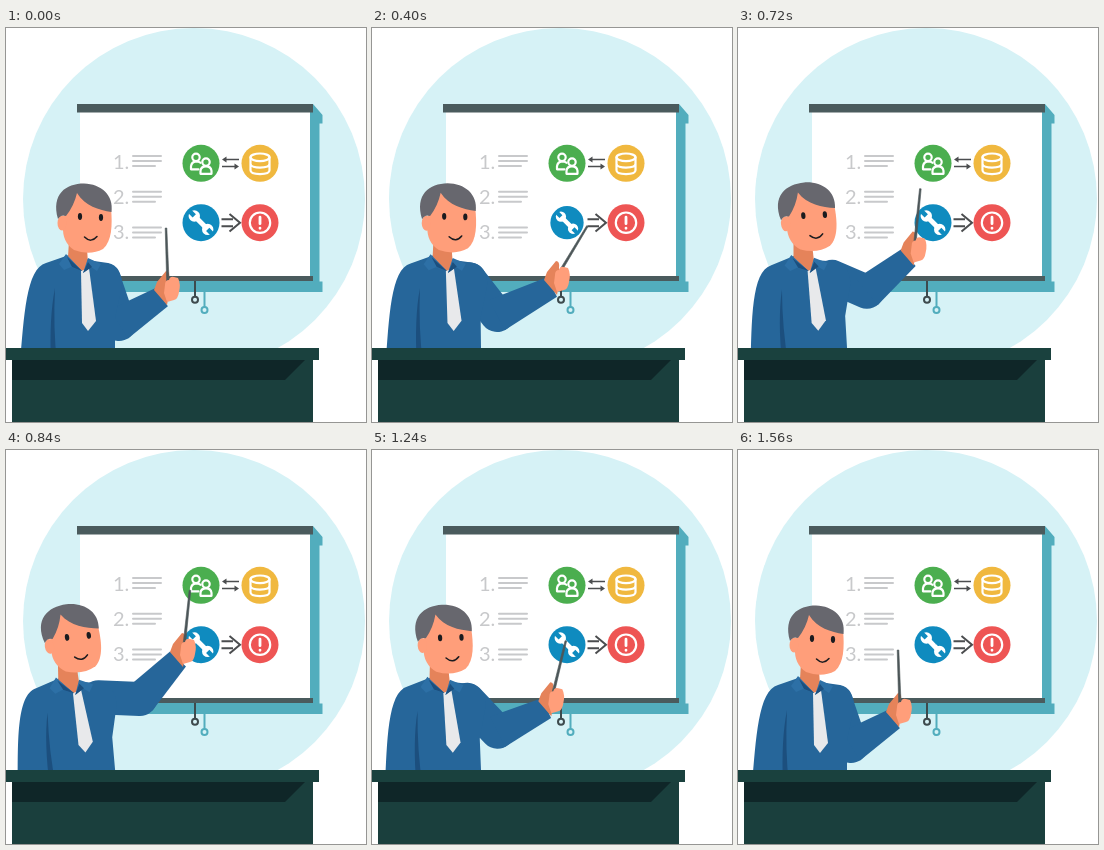
An HTML page that plays this animation: 360x394 px, repeating every 2 s.

```html
<!DOCTYPE html>
<html lang="en">
<head>
<meta charset="utf-8">
<title>Presenter</title>
<style>
  html, body { margin: 0; width: 100%; height: 100%; overflow: hidden; background: #fff; }
  svg { display: block; width: 360px; height: 394px; }
  text { font: 20px Lato, sans-serif; fill: #c8c9cb; }
  .line { fill: none; stroke: #fff; stroke-width: 2.2; stroke-linejoin: round; stroke-linecap: round; }
  .dark { stroke: #4b4d4f; stroke-linecap: butt; stroke-linejoin: miter; }
</style>
</head>
<body>
<svg viewBox="0 0 360 394">
  <circle cx="188" cy="171" r="171" fill="#d6f2f6"/>

  <g id="screen">
    <path d="M307 76L316.500 87V95.500H313.500V253.500H316.500V264H82L71 253H304V76Z" fill="#52adbd"/>
    <path d="M74 84H304V249H74Z" fill="#fff"/>
    <path d="M71 76H307V84.500H71ZM71 248H307V253H71Z" fill="#4a5b5d"/>
    <g fill="none" stroke-width="2">
      <path d="M189 253V268.500" stroke="#3d4a4d"/>
      <circle cx="189" cy="271.700" r="3" stroke="#3d4a4d"/>
      <path d="M198.500 263V279" stroke="#52adbd"/>
      <circle cx="198.500" cy="282" r="3" stroke="#52adbd"/>
    </g>
    <g id="list"></g>
    <path d="M216 131.500L220.500 128.500V130.700H233V132.300H220.500V134.500ZM233 138.500L228.500 135.500V137.700H216V139.300H228.500V141.500Z" fill="#4b4d4f"/>
    <path class="line dark" style="stroke-width:2" d="M215.500 191.300H227M215.500 198.300H227M223.500 186L234 194.700L223.500 203.500"/>
    <g id="people">
      <circle r="18.500" fill="#4bae4f"/>
      <g class="line">
        <circle cx="-5" cy="-6" r="3.700"/>
        <path d="M-2.500 6H-10V3Q-9.500-1.500-5-2Q-2-2-.5-.5"/>
        <circle cx="5" cy="-1.200" r="3.700"/>
        <path d="M-.5 10.500V7.500Q0 3 5 3T10.500 7.500V10.500Z"/>
      </g>
    </g>
    <g transform="translate(254 135.300)">
      <circle r="18.500" fill="#f0b83f"/>
      <g class="line">
        <ellipse cy="-6" rx="9.500" ry="3.800"/>
        <path d="M-9.500-6V7C-9.500 12 9.500 12 9.500 7V-6M-9.500 .5C-9.500 5.500 9.500 5.500 9.500 .5"/>
      </g>
    </g>
    <g id="tool">
      <circle r="18.500" fill="#0f8bbf"/>
      <g transform="rotate(45)">
        <path d="M-9 0H9" stroke="#fff" stroke-width="5"/>
        <circle cx="-9.500" r="5.700" fill="#fff"/>
        <circle cx="9.500" r="5.700" fill="#fff"/>
        <path d="M-16 0H-9.500M16 0H9.500" stroke="#0f8bbf" stroke-width="4.600"/>
      </g>
    </g>
    <g transform="translate(254 194.700)">
      <circle r="18.500" fill="#ee5554"/>
      <circle class="line" r="10.200"/>
      <path class="line" d="M0-5.500V1M0 5.500V5.600" style="stroke-width:2.800"/>
    </g>
  </g>

  <g fill="#26669a" stroke="#26669a" stroke-linecap="round">
    <path id="upperArm" stroke-width="34"/>
    <path id="forearm" stroke="none"/>
  </g>

  <g id="body">
    <path d="M14 335C18 290 20 240 40 235L63 227L88 233L102 235Q116 238 116 258L109 290V335Z" fill="#26669a"/>
    <path d="M49 260Q43 290 45 335H51Q47 300 49 260Z" fill="#1c4f7e"/>
    <path d="M63 213L81 220L82 236L77 244L62 229Z" fill="#e5835a"/>
    <path d="M75 243L83 240L90 293L82 303L76 295Z" fill="#e8e9eb"/>
    <path d="M60 226L76 243L65 239L58 242L53 236ZM82 230L95 236L91 243L85 239L77 245Z" fill="#2d70a6"/>
    <path d="M61 229L76 243L66 239ZM82 234L86 239L77 245Z" fill="#1c4f7e"/>
    <g id="head">
      <path d="M58 185L71 164L105 180C106.500 197 106 213 97 221Q84 228 68 222Q56 214 57 198Z" fill="#ff9e7a"/>
      <ellipse cx="56" cy="195" rx="4.500" ry="7.500" fill="#ff9e7a"/>
      <path d="M52 191C45 166 60 155.500 78 155.500C95 156 108 167 105.500 184C93 182 79 178 71 165Q68 178 60 188Q55 186 52 191Z" fill="#67676e"/>
      <g fill="#1b1b1f">
        <ellipse cx="74" cy="188.500" rx="2.100" ry="3.400"/>
        <ellipse cx="95" cy="189.500" rx="2.100" ry="3.400"/>
      </g>
      <path d="M78.500 209Q85 215.500 91 208.500" fill="none" stroke="#1b1b1f" stroke-width="1.500" stroke-linecap="round"/>
    </g>
  </g>

  <g id="hand">
    <path d="M-18 1L-15-7L-6-18Q-2-18-3-11L-2 0L-5 16Z" fill="#e5835a"/>
    <path id="pointer" d="M-1.200 0L-.8-57H.8L1.200 0Z" fill="#4c5658" stroke="#4c5658" stroke-width=".6"/>
    <path d="M-7-4Q-7-9-3-9Q-2-13 2-12L6-11Q9-5 7 3Q6 10 2 11L-5 13L-8 4Z" fill="#ff9e7a"/>
  </g>

  <path d="M6 331H307V394H6Z" fill="#1a3f3d"/>
  <path d="M6 331H300L279 352H6Z" fill="#0f2628"/>
  <path d="M0 320H313V332H0Z" fill="#1a413e"/>
</svg>

<script>
const $ = id => document.getElementById(id);
const place = (id, transform) => $(id).setAttribute("transform", transform);

$("list").innerHTML = [0, 1, 2].map(i => {
  const y = 128 + 35.8 * i;
  return `<text x="107" y="${141 + 35 * i}">${i + 1}.</text>
    <path d="M127 ${y}H155M127 ${y + 5}H155M127 ${y + 10}H149"
      stroke="#c8c9cb" stroke-width="2" stroke-linecap="round"/>`;
}).join("");

// time, hand x, hand y, pointer angle, body lean, elbow x, elbow y
const poses = [
  [0, 166, 261, -2, 0, 113, 296],
  [240, 178, 252, 5, -.9, 120, 288],
  [400, 190, 251, 31, -.7, 125, 287],
  [560, 181, 257, 11, -.9, 122, 288],
  [840, 182, 201, 6, -4.8, 134, 249],
  [1040, 186, 235, 18, -4.3, 133, 264],
  [1120, 189, 245, 30, -3.4, 130, 274],
  [1360, 178, 254, -3, -1.2, 121, 288],
  [1560, 166, 261, -2, 0, 113, 296]
];

function slope(i, k) {
  const a = poses[i - 1], b = poses[i + 1];
  return a && b ? (b[k] - a[k]) / (b[0] - a[0]) : 0;
}

// Smooth Hermite curve through the poses, at rest at both ends
function poseAt(t) {
  t = Math.min(t, 1560);
  const i = Math.max(0, poses.findIndex(p => p[0] >= t) - 1);
  const a = poses[i], b = poses[i + 1], span = b[0] - a[0];
  const u = (t - a[0]) / span, v = 1 - u;
  return a.map((_, k) =>
    v * v * ((1 + 2 * u) * a[k] + u * span * slope(i, k)) +
    u * u * ((1 + 2 * v) * b[k] - v * span * slope(i + 1, k))).slice(1);
}

function pulse(t, middle) {
  const d = Math.min(1, Math.abs(t - middle) / 160);
  return 1 - .1 * (1 + Math.cos(Math.PI * d));
}

function draw(t) {
  const [x, y, angle, lean, ex, ey] = poseAt(t);
  const widen = 1 - lean * .008;
  place("body", `translate(${110 * (1 - widen)} 0) scale(${widen} 1) rotate(${lean} 75 320)`);
  place("head", `translate(${-lean * .2} ${lean * .4}) rotate(${lean * .7} 78 205)`);
  place("hand", `translate(${x} ${y})`);
  place("pointer", `translate(-4 -4) rotate(${angle})`);
  place("tool", `translate(195 194.700) scale(${pulse(t, 320)})`);
  place("people", `translate(195 135.300) scale(${pulse(t, 1040)})`);

  const shoulder = [98 + lean * 1.2, 252 + lean];
  $("upperArm").setAttribute("d", `M${shoulder}L${ex} ${ey}`);
  const wx = x - 10, wy = y + 8;
  const dir = Math.atan2(wy - ey, wx - ex);
  const nx = -Math.sin(dir), ny = Math.cos(dir);
  const edge = (px, py, r) => `${px + nx * r} ${py + ny * r}`;
  $("forearm").setAttribute("d",
    `M${edge(ex, ey, -17)}L${edge(wx, wy, -11)}L${edge(wx, wy, 11)}L${edge(ex, ey, 17)}Z`);
}

function tick() {
  draw(Math.floor(performance.now() % 2000 / 40) * 40);
  requestAnimationFrame(tick);
}
tick();
</script>
</body>
</html>
```
